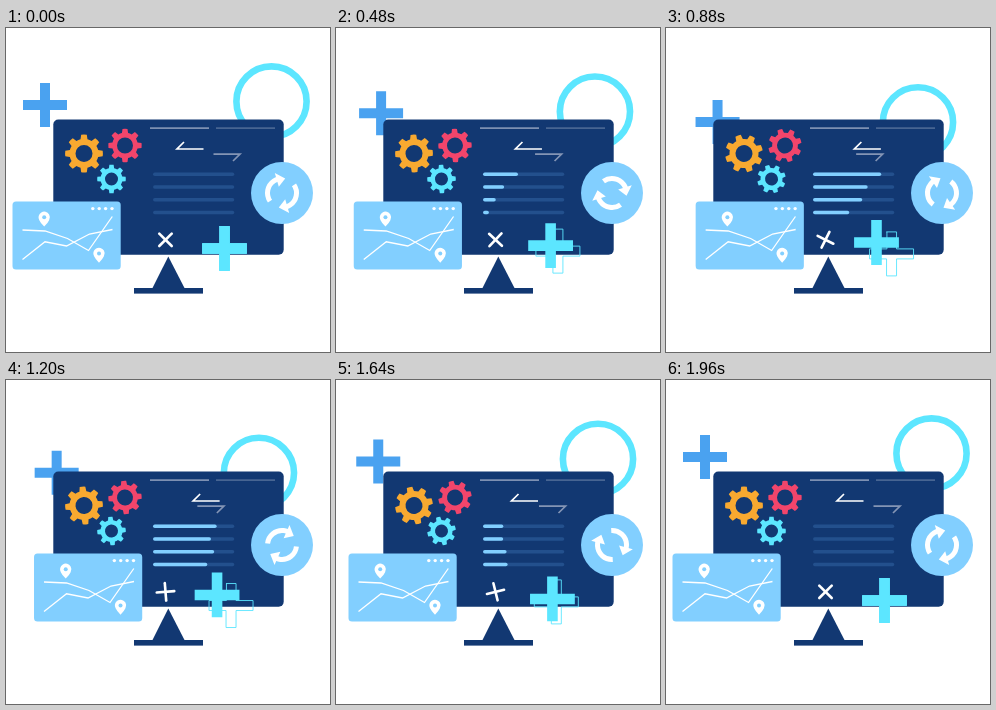
Write an HTML page with a canvas that moves like this. It is 324x324 px and loops after 2 s.

```html
<!DOCTYPE html>
<html lang="en">
<head>
<meta charset="utf-8">
<title>Monitor loop</title>
<style>
html, body { margin: 0; width: 100%; height: 100%; overflow: hidden; background: #fff; }
canvas { display: block; width: 324px; height: 324px; }
</style>
</head>
<body>
<canvas id="stage"></canvas>
<script>
const SIZE = 324, LOOP = 2000, STEP = 40, LAST = 1960, PEAK = 1000;
const TAU = Math.PI * 2;
const NAVY = '#123872', SKY = '#82cfff', CYAN = '#5ce6ff', BLUE = '#4aa2f0';
const canvas = document.getElementById('stage');
const ctx = canvas.getContext('2d');
const scale = window.devicePixelRatio || 1;
canvas.width = canvas.height = SIZE * scale;

const ease = u => (1 - Math.cos(Math.PI * Math.min(1, Math.max(0, u)))) / 2;

// Eased rise from start to peak, then eased fall until the last frame.
function swing(t, start = 0, peak = PEAK) {
  return t < peak ? ease((t - start) / (peak - start)) : ease((LAST - t) / (LAST - peak));
}

function at(x, y, angle, draw) {
  ctx.save();
  ctx.translate(x, y);
  ctx.rotate(angle);
  draw();
  ctx.restore();
}

function line(points, color, width, cap = 'butt') {
  ctx.beginPath();
  points.forEach(([x, y]) => ctx.lineTo(x, y));
  ctx.strokeStyle = color;
  ctx.lineWidth = width;
  ctx.lineCap = cap;
  ctx.lineJoin = 'miter';
  ctx.stroke();
}

function shape(points, color) {
  ctx.beginPath();
  points.forEach(([x, y]) => ctx.lineTo(x, y));
  ctx.closePath();
  ctx.fillStyle = color;
  ctx.fill();
}

function disc(x, y, r, color) {
  ctx.beginPath();
  ctx.arc(x, y, r, 0, TAU);
  ctx.fillStyle = color;
  ctx.fill();
}

function panel(x, y, w, h, r, color) {
  ctx.beginPath();
  ctx.roundRect(x, y, w, h, r);
  ctx.fillStyle = color;
  ctx.fill();
}

function plusPath(x, y, a, b) {
  const pts = [[-b, -a], [b, -a], [b, -b], [a, -b], [a, b], [b, b],
               [b, a], [-b, a], [-b, b], [-a, b], [-a, -b], [-b, -b]];
  return pts.map(([px, py]) => [x + px, y + py]);
}

function gear(x, y, r, hole, color, angle) {
  at(x, y, angle, () => {
    const body = r * 0.77;
    ctx.beginPath();
    for (let i = 0; i < 8; i++) {
      const mid = i * TAU / 8;
      ctx.arc(0, 0, body, mid - 0.24, mid - 0.24);
      ctx.arc(0, 0, r, mid - 0.15, mid + 0.15);
      ctx.arc(0, 0, body, mid + 0.24, mid + TAU / 8 - 0.24);
    }
    ctx.closePath();
    ctx.moveTo(hole, 0);
    ctx.arc(0, 0, hole, 0, TAU);
    ctx.fillStyle = color;
    ctx.fill('evenodd');
  });
}

function pin(x, y) {
  ctx.beginPath();
  ctx.arc(x, y, 5.7, Math.PI * 0.83, Math.PI * 2.17);
  ctx.quadraticCurveTo(x + 3.5, y + 6, x, y + 9.3);
  ctx.quadraticCurveTo(x - 3.5, y + 6, x - 4.9, y + 2.9);
  ctx.fillStyle = '#fff';
  ctx.fill();
  disc(x, y, 2, SKY);
}

function backdrop(p) {
  ctx.beginPath();
  ctx.arc(265.5 - 14 * p, 73.5 + 21.6 * p, 35.1, 0, TAU);
  ctx.strokeStyle = CYAN;
  ctx.lineWidth = 6.6;
  ctx.stroke();
  shape(plusPath(39 + 13 * p, 77 + 17.5 * p, 22, 5), BLUE);
}

function monitor() {
  panel(47.3, 91.5, 230.4, 135.3, 5, NAVY);
  shape([[162.3, 228.5], [179, 261], [146, 261]], NAVY);
  ctx.fillRect(128, 260, 69, 5.6);
  line([[144, 100.2], [203, 100.2]], '#7d90b2', 1.7);
  line([[210, 100.2], [269, 100.2]], '#476592', 1.7);
}

function swapArrows(p) {
  const a = 171 + 18 * p, b = 234 - 18 * p;
  line([[a + 26.5, 121], [a, 121], [a + 7, 114]], '#fff', 1.7);
  line([[b - 26.5, 126.2], [b, 126.2], [b - 7, 133]], '#8495b5', 1.7);
}

function bars(t) {
  [67, 57, 58, 51].forEach((max, i) => {
    const y = 146.2 + i * 12.8, w = max * swing(t, i * 120, PEAK + i * 80);
    line([[148.8, y], [226.5, y]], '#23508d', 3.5, 'round');
    if (w > 0.1) line([[148.8, y], [148.8 + w, y]], SKY, 3.5, 'round');
  });
}

function refresh(turn) {
  disc(276, 165, 31, SKY);
  for (const half of [0, Math.PI]) {
    at(276, 165, turn + half, () => {
      ctx.beginPath();
      ctx.arc(0, 0, 14.5, TAU * 0.405, TAU * 0.7);
      ctx.strokeStyle = '#fff';
      ctx.lineWidth = 5;
      ctx.lineCap = 'butt';
      ctx.stroke();
      shape([[-7.2, -20], [3.2, -14.4], [-3.2, -6.3]], '#fff');
    });
  }
}

function chart(p) {
  at(24 * p, 0, 0, () => {
    panel(6.5, 173.5, 108.2, 68, 3.5, SKY);
    for (let i = 0; i < 4; i++) disc(86.8 + i * 6.4, 180.6, 1.7, '#fff');
    line([[16.5, 231.5], [39, 213.8], [60.5, 218], [83.5, 206], [106.5, 201.5]], '#fff', 1.3);
    line([[16.5, 202], [39, 203], [61.5, 210.5], [82.5, 222.5], [106.3, 188.5]], '#fff', 1.3);
    pin(38.2, 189.3);
    pin(93, 225.4);
  });
}

function crosses(p) {
  ctx.beginPath();
  plusPath(218.5 + 7.3 * p, 220.5 + 5.6 * p, 22, 5).forEach(([x, y]) => ctx.lineTo(x, y));
  ctx.closePath();
  ctx.strokeStyle = CYAN;
  ctx.lineWidth = 0.9;
  ctx.stroke();
  shape(plusPath(218.5 - 8.3 * p, 220.5 - 6.2 * p, 22.4, 5.3), CYAN);
}

function draw(t) {
  const p = swing(t), turn = TAU * t / LAST;
  ctx.setTransform(scale, 0, 0, scale, 0, 0);
  ctx.fillStyle = '#fff';
  ctx.fillRect(0, 0, SIZE, SIZE);
  backdrop(p);
  monitor();
  swapArrows(p);
  bars(t);
  gear(78, 125.5, 18.9, 8.5, '#f8a930', turn);
  gear(119, 117.5, 16.7, 8, '#f2456b', turn);
  gear(105.5, 151, 14.3, 6.5, CYAN, turn);
  at(159.5, 211.8, turn + Math.PI / 4, () => {
    line([[-8.8, 0], [8.8, 0]], '#fff', 2.6, 'round');
    line([[0, -8.8], [0, 8.8]], '#fff', 2.6, 'round');
  });
  refresh(turn);
  chart(p);
  crosses(p);
}

const begin = performance.now();
function tick() {
  const t = (performance.now() - begin) % LOOP;
  draw(Math.floor(t / STEP) * STEP);
  requestAnimationFrame(tick);
}
tick();
</script>
</body>
</html>
```
